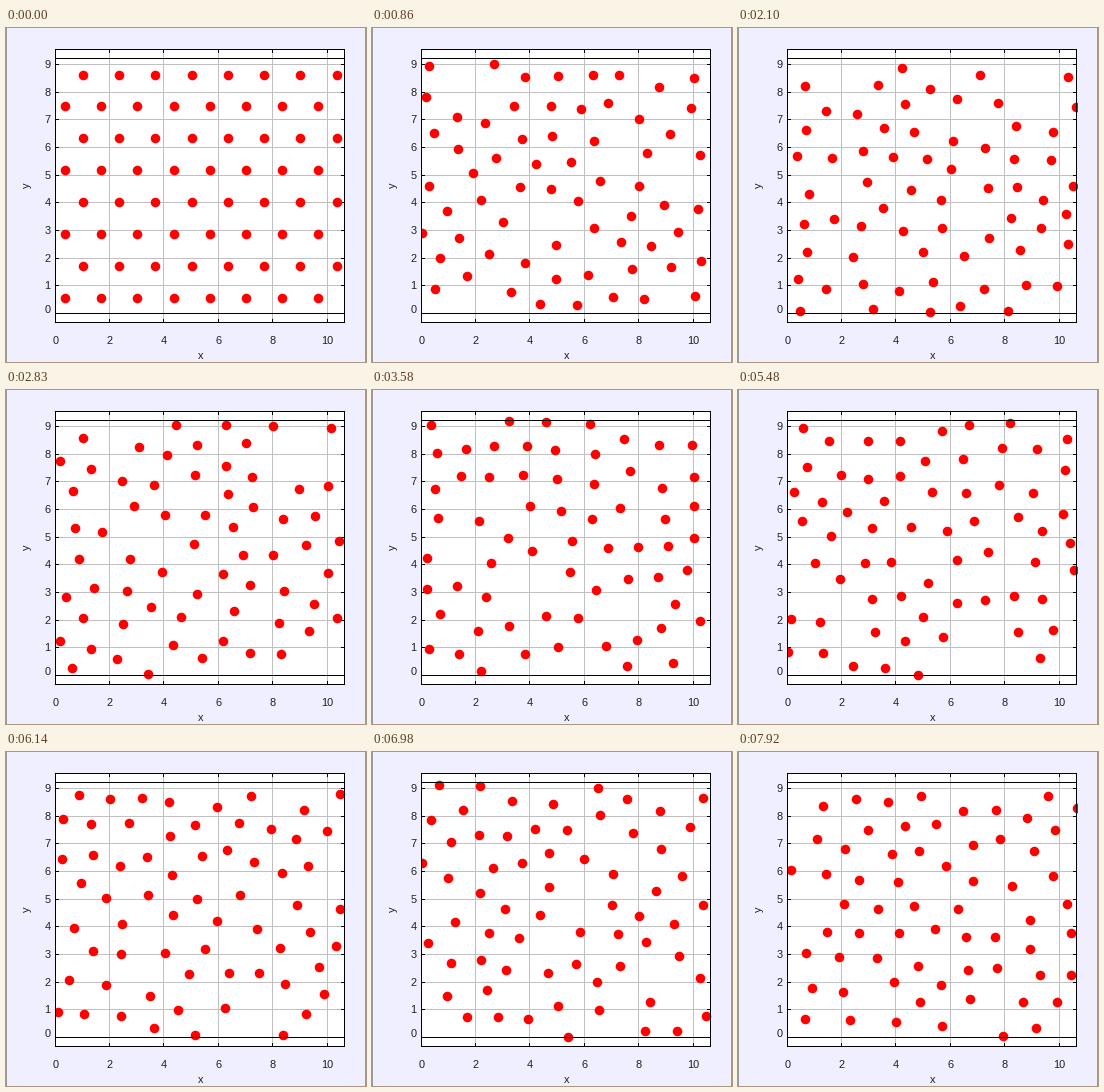
Recreate the animation shown at these times as a matplotlib script. Size 360x334 px, loop 8 s.

```python
import numpy as np
import matplotlib.pyplot as plt
from matplotlib.animation import FuncAnimation
from matplotlib.patches import Rectangle

W, H, DPI = 360, 334, 64
PT = 72 / DPI                      # points per pixel
LEFT, RIGHT, TOP, BOTTOM = 49, 338, 21, 294
ORIGIN = np.array([49.25, 285.5])  # pixel place of (0, 0)
SCALE = np.array([27.18, -27.65])  # pixels per unit

SIDE = 8
N = SIDE * SIDE
BOX = 32 / 3 * np.array([1, np.sqrt(3) / 2])
DT, STEPS = 0.01, 10               # time step, steps per picture

LOOP, INTERVAL = 8000, 20
PICTURES = 60
# The simulation redraws slightly slower in the second half.
CHANGES = np.interp(np.arange(PICTURES), [0, 26, PICTURES - 1],
                    [360, 3580, 7920])


def lattice():
    """Triangular lattice, every other row shifted by half a cell."""
    row, col = np.divmod(np.arange(N), SIDE)
    x = (col + 0.25 + 0.5 * (row % 2)) * BOX[0] / SIDE
    y = (row + 0.5) * BOX[1] / SIDE
    return np.column_stack([x, y])


def random_velocities(seed=8):
    """Uniform velocities with no net momentum and unit energy per particle."""
    vel = np.random.default_rng(seed).uniform(-0.5, 0.5, (N, 2))
    vel -= vel.mean(0)
    return vel / np.sqrt((vel ** 2).mean())


def forces(pos):
    """Lennard-Jones accelerations in the periodic box."""
    d = pos[:, None] - pos[None]
    d -= BOX * np.round(d / BOX)
    s = (d ** 2).sum(-1)
    np.fill_diagonal(s, np.inf)
    w = 48 / s ** 7 - 24 / s ** 4
    return (w[..., None] * d).sum(1)


def simulate():
    """Velocity Verlet; keeps the wrapped positions of every picture."""
    pos, vel = lattice(), random_velocities()
    acc = forces(pos)
    states = [pos]
    for _ in range(PICTURES):
        for _ in range(STEPS):
            vel = vel + acc * DT / 2
            pos = pos + vel * DT
            acc = forces(pos)
            vel = vel + acc * DT / 2
        states.append(pos % BOX)
    return states


def to_pixels(pos):
    return np.floor(ORIGIN + pos * SCALE)


fig = plt.figure(figsize=(W / DPI, H / DPI), dpi=DPI, facecolor="#efefff")
ax = fig.add_axes([0, 0, 1, 1])
ax.set(xlim=(0, W), ylim=(H, 0))
ax.axis("off")


def line(x0, y0, x1, y1, color, z):
    ax.plot([x0, x1], [y0, y1], color=color, lw=PT, antialiased=False,
            solid_capstyle="projecting", zorder=z)


def label(x, y, s, ha="center", va="baseline", **kw):
    ax.text(x, y, s, family="Liberation Sans", size=11 * PT, color="#202020",
            ha=ha, va=va, **kw)


panel = Rectangle((LEFT, TOP), RIGHT - LEFT + 1, BOTTOM - TOP + 1,
                  fc="white", ec="none", zorder=0)
ax.add_patch(panel)

for x in (0, W - 1):
    line(x, 0, x, H, "#9a9a9a", 0)

for value in range(0, 11, 2):
    x = to_pixels(np.array([value, 0]))[0]
    line(x, TOP, x, BOTTOM, "#c0c0c0", 1)
    line(x, TOP, x, TOP + 3, "black", 2)
    line(x, BOTTOM - 3, x, BOTTOM, "black", 2)
    label(x + 0.5, 316, str(value))

for value in range(10):
    y = to_pixels(np.array([0, value]))[1]
    line(LEFT, y, RIGHT, y, "#c0c0c0", 1)
    line(LEFT, y, LEFT + 3, y, "black", 2)
    line(RIGHT - 3, y, RIGHT, y, "black", 2)
    # The lowest label sits a little above its grid line.
    label(44.5, y + (4 if value else 0), str(value), ha="right")

label(194.5, 331, "x")
label(21, 157, "y", va="center", rotation=90)

walls = to_pixels(np.array([BOX * 0, BOX]))[:, 1]
for y in (TOP, BOTTOM, *walls):
    line(LEFT, y, RIGHT, y, "black", 4)
for x in (LEFT, RIGHT):
    line(x, TOP, x, BOTTOM, "black", 4)

dots, = ax.plot([], [], "o", color="red", ms=9.6 * PT, mew=0,
                antialiased=False, zorder=3)
dots.set_clip_path(panel)

STATES = simulate()


def draw(frame):
    shown = np.searchsorted(CHANGES, frame * INTERVAL, side="right")
    dots.set_data(*(to_pixels(STATES[shown]) + 0.5).T)
    return dots,


anim = FuncAnimation(fig, draw, frames=LOOP // INTERVAL, interval=INTERVAL,
                     repeat=True, repeat_delay=0)
plt.show()
```
